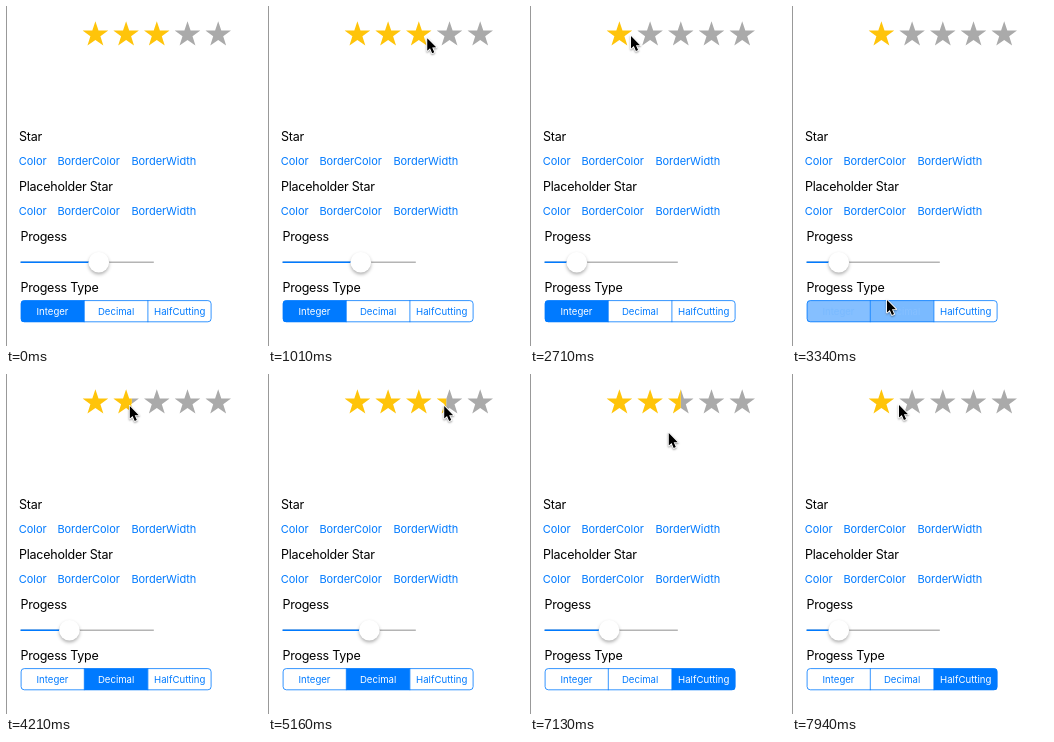
Write an HTML page with a canvas that moves like this. It is 256 px wide and 340 px high and loops after 7990 ms.

```html
<!DOCTYPE html>
<html lang="en">
<head>
<meta charset="utf-8">
<title>Star rating demo</title>
<style>
html, body { margin: 0; width: 100%; height: 100%; overflow: hidden; background: #fff; }
canvas { display: block; width: 256px; height: 340px; }
</style>
</head>
<body>
<canvas id="stage"></canvas>
<script>
const W = 256, H = 340, LOOP = 7990;
const BLUE = '#007aff', GOLD = '#ffc40a', GRAY = '#aaaaaa';
const FONT = 'Inter, Roboto, "Liberation Sans", sans-serif';
const STAR = { left: 76.6, pitch: 30.7, width: 25.6, y: 28.7, r: 13.5 };
const BAR = { x: 14.7, y: 294.2, w: 190.8, h: 22 };

// Pointer path: time, x, y, sideways bow of the stretch that ends here
const PATH = [
  [360, 250, 110], [760, 152, 34], [1070, 160, 32], [1500, 96, 32],
  [2110, 182, 33], [2450, 101, 30], [2710, 101, 30], [3220, 95, 294, 40],
  [3380, 95, 294], [3700, 104, 33], [3960, 141, 32], [4270, 122, 32],
  [4560, 174, 32], [4850, 128, 32], [5260, 184.5, 32], [5760, 146, 32],
  [5860, 147, 32], [6450, 172, 297], [6770, 172, 297], [7220, 135, 32],
  [7540, 128, 31], [7940, 107, 31]
];

// Periods in which the pointer drags the rating, with the rounding step
const DRAGS = [
  { from: 800, to: 2470, step: 1 },
  { from: 3720, to: 5800, step: 0 },
  { from: 7220, to: LOOP, step: 0.5 }
];
const TO_DECIMAL = 3250, TO_HALF = 6650, FADE = 175;

const canvas = document.getElementById('stage');
const ctx = canvas.getContext('2d');
const ratio = window.devicePixelRatio || 1;
canvas.width = W * ratio;
canvas.height = H * ratio;
ctx.scale(ratio, ratio);

const clamp = (v, lo, hi) => Math.min(hi, Math.max(lo, v));
const smooth = u => u * u * (3 - 2 * u);
const snap = (v, step) => step ? Math.round(v / step) * step : v;

function pointerAt(t) {
  const i = PATH.findIndex(p => p[0] > t);
  if (i < 0) return PATH[PATH.length - 1].slice(1, 3);
  if (i === 0) return PATH[0].slice(1, 3);
  const [t0, x0, y0] = PATH[i - 1];
  const [t1, x1, y1, bow = 0] = PATH[i];
  const u = smooth((t - t0) / (t1 - t0));
  return [x0 + (x1 - x0) * u + bow * 4 * u * (1 - u), y0 + (y1 - y0) * u];
}

function ratingAt(t) {
  const drag = DRAGS.filter(d => t >= d.from).pop();
  if (!drag) return 3;
  const x = pointerAt(Math.min(t, drag.to))[0] + 2 - STAR.left;
  const whole = Math.floor(x / STAR.pitch);
  const part = clamp((x - whole * STAR.pitch) / STAR.width, 0, 1);
  return snap(clamp(whole + part, 0, 5), drag.step);
}

function text(str, x, y, size, color, spacing = 0, align = 'left') {
  ctx.font = `${size}px ${FONT}`;
  ctx.letterSpacing = spacing + 'px';
  ctx.textAlign = align;
  ctx.fillStyle = color;
  ctx.fillText(str, x, y);
}

function starPath(cx) {
  ctx.beginPath();
  for (let i = 0; i < 10; i++) {
    const a = i * Math.PI / 5;
    const r = i % 2 ? STAR.r * 0.39 : STAR.r;
    ctx.lineTo(cx + r * Math.sin(a), STAR.y - r * Math.cos(a));
  }
  ctx.closePath();
}

function drawStars(rating) {
  for (let i = 0; i < 5; i++) {
    const left = STAR.left + i * STAR.pitch;
    const part = clamp(rating - i, 0, 1);
    const fill = (x, w, color) => {
      if (w <= 0) return;
      ctx.save();
      ctx.beginPath();
      ctx.rect(x, 0, w, 60);
      ctx.clip();
      starPath(left + STAR.width / 2);
      ctx.fillStyle = color;
      ctx.fill();
      ctx.restore();
    };
    const cut = part * STAR.width;
    fill(left + cut, STAR.width - cut, GRAY);
    fill(left, cut, GOLD);
  }
}

function drawLabels() {
  const heading = (str, x, y) => text(str, x, y, 12.5, '#000', -0.23);
  const button = (str, x, y) => text(str, x, y, 11, BLUE, -0.06);
  heading('Star', 13, 135);
  heading('Placeholder Star', 13, 185);
  heading('Progess', 14.4, 235);
  heading('Progess Type', 14.4, 285.5);
  for (const y of [159, 209]) {
    button('Color', 12.8, y);
    button('BorderColor', 51.4, y);
    button('BorderWidth', 125.4, y);
  }
}

function drawSlider(rating) {
  const x = 23.8 + 23 * rating;
  ctx.fillStyle = '#b4b4b4';
  ctx.fillRect(14.6, 255.5, 133.2, 1.5);
  ctx.fillStyle = BLUE;
  ctx.fillRect(14.6, 255.5, x - 14.6, 1.5);
  ctx.save();
  ctx.shadowColor = 'rgba(0,0,0,0.3)';
  ctx.shadowBlur = 3.5 * ratio;
  ctx.shadowOffsetY = 2 * ratio;
  ctx.beginPath();
  ctx.arc(x, 256.2, 10.3, 0, Math.PI * 2);
  ctx.fillStyle = '#fff';
  ctx.fill();
  ctx.restore();
}

// Blue laid over white with the given strength
const tint = k => `rgb(${Math.round(255 * (1 - k))},${Math.round(255 - 133 * k)},255)`;

function drawSegments(t) {
  const a = clamp((t - TO_DECIMAL) / FADE, 0, 1);
  const b = clamp((t - TO_HALF) / FADE, 0, 1);
  const parts = [['Integer', 1 - a], ['Decimal', a * (1 - b)], ['HalfCutting', b]];
  const { x, y, w, h } = BAR;
  const third = w / 3;
  ctx.save();
  ctx.beginPath();
  ctx.roundRect(x, y, w, h, 3.5);
  ctx.clip();
  parts.forEach(([, k], i) => {
    ctx.fillStyle = tint(k);
    ctx.fillRect(x + i * third, y, third, h);
  });
  ctx.restore();
  ctx.strokeStyle = BLUE;
  ctx.lineWidth = 0.8;
  ctx.beginPath();
  ctx.roundRect(x + 0.4, y + 0.4, w - 0.8, h - 0.8, 3.2);
  for (const i of [1, 2]) {
    ctx.moveTo(x + i * third, y);
    ctx.lineTo(x + i * third, y + h);
  }
  ctx.stroke();
  parts.forEach(([name, k], i) => {
    text(name, x + (i + 0.5) * third, 308.8, 9.6, tint(1 - k), 0, 'center');
  });
}

function drawPointer(x, y) {
  const shape = [[0, 0], [0, 14.3], [3.2, 11.4], [5.6, 17], [8, 16], [5.6, 10.5], [10.2, 10.4]];
  ctx.save();
  ctx.translate(x, y);
  ctx.scale(0.88, 0.88);
  ctx.beginPath();
  for (const [px, py] of shape) ctx.lineTo(px, py);
  ctx.closePath();
  ctx.lineJoin = 'round';
  ctx.lineWidth = 2;
  ctx.strokeStyle = '#fff';
  ctx.shadowColor = 'rgba(0,0,0,0.4)';
  ctx.shadowBlur = 2 * ratio;
  ctx.shadowOffsetY = ratio;
  ctx.stroke();
  ctx.shadowColor = 'transparent';
  ctx.fillStyle = '#000';
  ctx.fill();
  ctx.restore();
}

function draw(t) {
  const rating = ratingAt(t);
  ctx.fillStyle = '#fff';
  ctx.fillRect(0, 0, W, H);
  ctx.fillStyle = '#999';
  ctx.fillRect(0, 0, 1, H);
  drawStars(t >= TO_HALF ? snap(rating, 0.5) : rating);
  drawLabels();
  drawSlider(rating);
  drawSegments(t);
  if (t >= PATH[0][0]) drawPointer(...pointerAt(t));
}

const start = performance.now();
function tick() {
  draw((performance.now() - start) % LOOP);
  requestAnimationFrame(tick);
}
tick();
</script>
</body>
</html>
```
